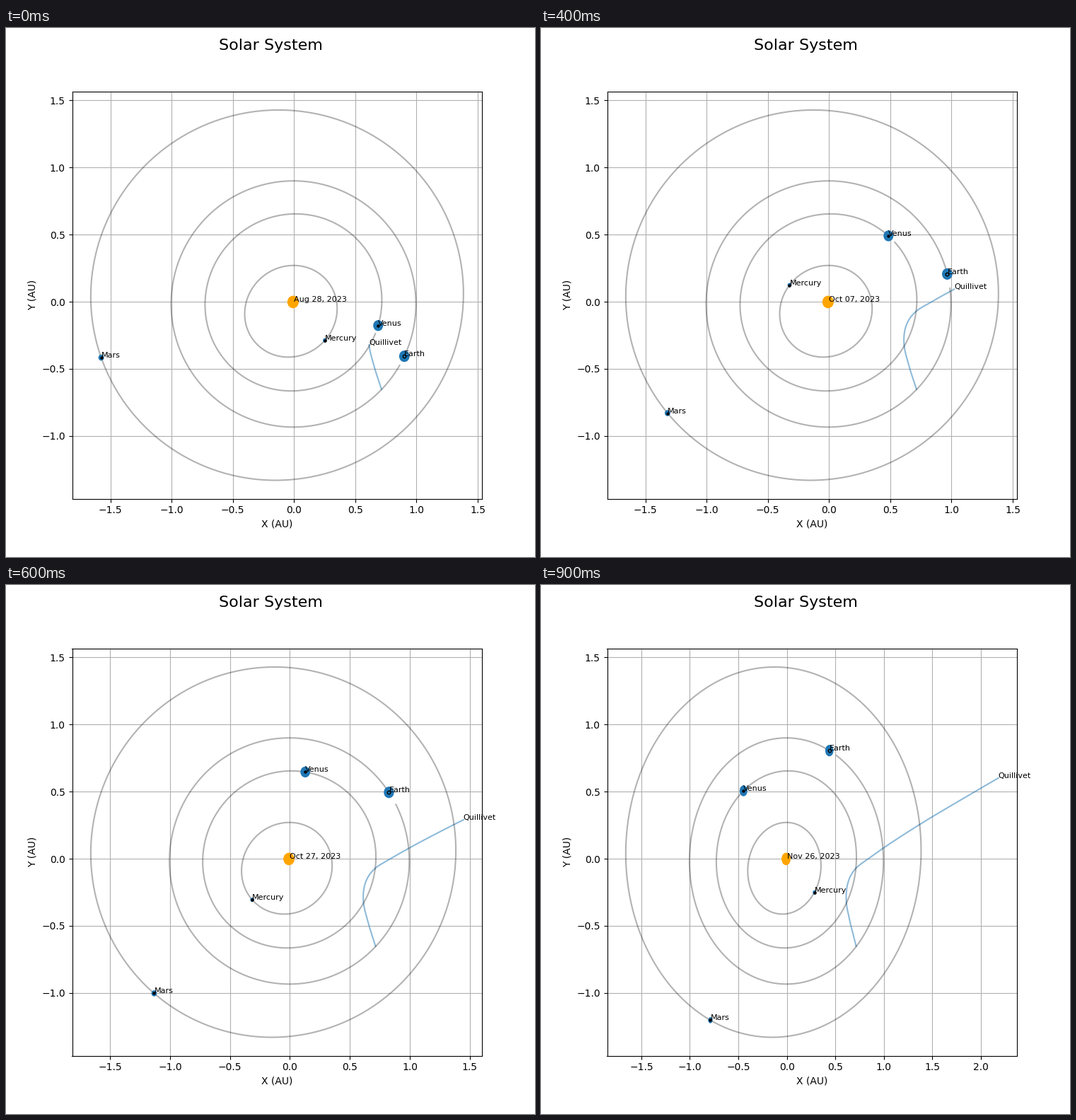
A matplotlib script that plays this animation: 748x748 px, repeating every 1000 ms.

```python
import numpy as np
import matplotlib.pyplot as plt
import matplotlib.dates as mdates
from matplotlib.animation import FuncAnimation
from matplotlib.patches import Circle

FRAMES, INTERVAL, DAYS_PER_FRAME = 10, 100, 10
START = mdates.date2num(np.datetime64("2023-08-28"))
J2000 = 10957.5
AU_KM = 1.495978707e8
TILT = np.radians(23.4393)
SUN = np.array([-0.0083, -0.0020])  # offset from the barycentre

# a, e, inclination, mean longitude, its rate per century, perihelion, node,
# radius in km, size and offset of the break in the orbit line
PLANETS = {
    "Mercury": (0.387099, 0.20564, 7.005, 252.25032, 149472.67411,
                77.496, 48.301, 2440, 0.20, 0.10),
    "Venus": (0.723336, 0.00677, 3.395, 181.97910, 58517.81539,
              131.603, 76.614, 6052, 0.13, 0.01),
    "Earth": (1.000003, 0.01670, 0.0, 100.46457, 35999.37245,
              103.014, 0.0, 6378, 0.118, 0.0),
    "Mars": (1.523710, 0.09341, 1.850, -4.55343, 19140.30268,
             -23.839, 49.490, 3396, 0.06, 0.04),
}

# probe position every ten days, beginning two steps before the first frame
PROBE = np.array([
    (0.714, -0.652), (0.656, -0.487), (0.613, -0.322), (0.628, -0.183),
    (0.703, -0.078), (0.845, 0.003), (1.022, 0.093), (1.220, 0.187),
    (1.447, 0.290), (1.684, 0.392), (1.929, 0.496), (2.181, 0.602),
])
PROBE_LEAD, SUBSTEPS = 2, 16


def orbit_xy(planet, mean_anomaly):
    """Equatorial x, y of a Kepler orbit at the given mean anomaly."""
    a, e, inc, _, _, peri, node = planet[:7]
    inc, peri, node = np.radians([inc, peri, node])
    m = np.asarray(mean_anomaly, float)
    ecc = m + e * np.sin(m)
    for _ in range(6):
        ecc = ecc - (ecc - e * np.sin(ecc) - m) / (1 - e * np.cos(ecc))
    px, py = a * (np.cos(ecc) - e), a * np.sqrt(1 - e * e) * np.sin(ecc)
    w = peri - node
    u, v = px * np.cos(w) - py * np.sin(w), px * np.sin(w) + py * np.cos(w)
    x = u * np.cos(node) - v * np.cos(inc) * np.sin(node)
    y = u * np.sin(node) + v * np.cos(inc) * np.cos(node)
    z = v * np.sin(inc)
    return x + SUN[0], y * np.cos(TILT) - z * np.sin(TILT) + SUN[1]


def smooth_path(points, substeps):
    """Catmull-Rom curve through points that are evenly spaced in time."""
    slope = np.gradient(points, axis=0)
    s = np.linspace(0, 1, substeps, endpoint=False)[:, None]
    parts = [
        (1 + 2 * s) * (1 - s) ** 2 * p + s * (1 - s) ** 2 * dp
        + s * s * (3 - 2 * s) * q + s * s * (s - 1) * dq
        for p, q, dp, dq in zip(points, points[1:], slope, slope[1:])
    ]
    return np.vstack(parts + [points[-1:]])


def padded(low, high):
    pad = 0.05 * (high - low)
    return low - pad, high + pad


probe_path = smooth_path(PROBE, SUBSTEPS)
outer_x, outer_y = orbit_xy(PLANETS["Mars"], np.linspace(0, 2 * np.pi, 721))

plt.rcParams["font.family"] = "DejaVu Sans"
fig, ax = plt.subplots(figsize=(7.48, 7.48), dpi=100)
fig.suptitle("Solar System", fontsize=16)
ax.set_xlabel("X (AU)")
ax.set_ylabel("Y (AU)")
ax.grid(True)
ax.set_ylim(*padded(outer_y.min(), outer_y.max()))


def add_label(text):
    return ax.text(0, 0, text, fontsize=8, zorder=4)


ax.add_patch(Circle(SUN, 10 * 695700 / AU_KM, color="orange", lw=0, zorder=2.5))
date_label = add_label("")
probe_line, = ax.plot([], [], color="C0", alpha=0.5)
probe_label = add_label("Quillivet")

bodies = {}
for name, planet in PLANETS.items():
    line, = ax.plot([], [], color="black", alpha=0.3)
    disc = ax.add_patch(Circle((0, 0), 1000 * planet[7] / AU_KM,
                               color="C0", lw=0, zorder=2.5))
    is_ring = name == "Earth"
    core, = ax.plot([], [], "o", ms=3.2 if is_ring else 2.2, mew=1, mec="black",
                    mfc="none" if is_ring else "black", zorder=3)
    bodies[name] = line, disc, core, add_label(name)


def draw_planet(name, day):
    planet = PLANETS[name]
    line, disc, core, label = bodies[name]
    longitude = planet[3] + planet[4] * (day - J2000) / 36525
    m = np.radians((longitude - planet[5]) % 360)
    x, y = (float(c) for c in orbit_xy(planet, m))
    heading = np.arctan2(y / np.cos(TILT), x)
    gap = max(0, planet[8] * np.cos(heading - np.radians(18)) - planet[9])
    line.set_data(*orbit_xy(planet, np.linspace(m, m + 2 * np.pi - gap, 360)))
    disc.center = x, y
    core.set_data([x], [y])
    label.set_position((x, y))


def update(frame):
    day = START + DAYS_PER_FRAME * frame
    date_label.set_text(mdates.num2date(day).strftime("%b %d, %Y"))
    for name in PLANETS:
        draw_planet(name, day)
    trail = probe_path[:(frame + PROBE_LEAD) * SUBSTEPS + 1]
    probe_line.set_data(*trail.T)
    probe_label.set_position(trail[-1])
    ax.set_xlim(*padded(outer_x.min(), max(outer_x.max(), trail[:, 0].max())))
    return []


animation = FuncAnimation(fig, update, frames=FRAMES, interval=INTERVAL,
                          init_func=lambda: update(0), repeat=True,
                          repeat_delay=0, blit=False)
plt.show()
```
